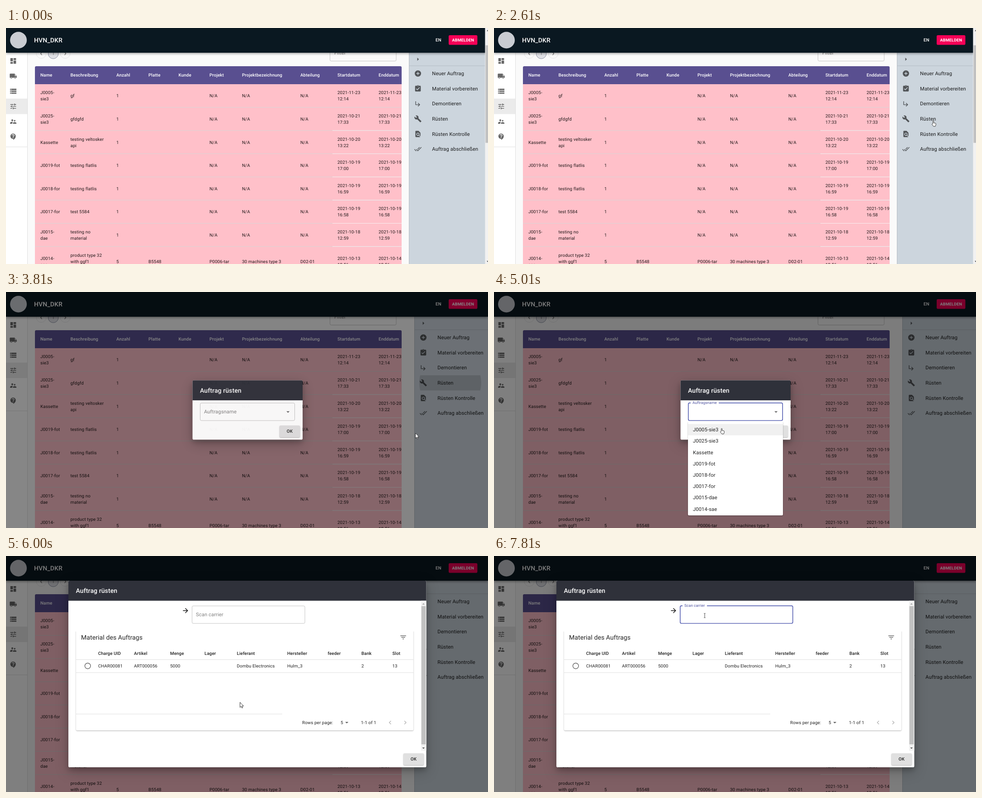
An HTML page that plays this animation: 1066x525 px, repeating every 8000 ms.

```html
<!DOCTYPE html>
<html lang="de">
<head>
<meta charset="utf-8">
<title>Auftrag rüsten</title>
<style>
html, body { margin: 0; width: 100%; height: 100%; overflow: hidden; background: #fafafa; }
svg { display: block; width: 100vw; height: 100vh; }
text {
  font: 400 9.8px Roboto, sans-serif; letter-spacing: .0107em;
  fill: rgba(0, 0, 0, .87); white-space: pre; text-rendering: geometricPrecision;
}
.b { font-weight: 500; }
.w { fill: #fff; }
.mute { fill: rgba(0, 0, 0, .5); }
.mid { text-anchor: middle; }
.accent { fill: #4a4f9e; }
.icons { fill: rgba(0, 0, 0, .6); fill-rule: evenodd; }
.line { stroke: #e0e0e0; fill: none; }
.frame { fill: none; stroke: #c4c4c4; }
.focus { fill: none; stroke: #3f4aa8; stroke-width: 1.4; }
.raised { filter: drop-shadow(0 1px 1.2px rgba(0, 0, 0, .32)); }
.modal { filter: drop-shadow(0 6px 6px rgba(0, 0, 0, .2)) drop-shadow(0 8px 14px rgba(0, 0, 0, .22)); }
.bar { filter: drop-shadow(0 2px 2.5px rgba(0, 0, 0, .38)); }
.cursor path { fill: #fff; stroke: #222; stroke-width: .9; stroke-linejoin: round; }
</style>
</head>
<body>
<svg id="stage" viewBox="0 0 1066 525"></svg>
<script>
const LOOP = 8000;
const stage = document.getElementById('stage');

const ICONS = {
  dashboard: 'M3 13h8V3H3zm0 8h8v-6H3zm10 0h8V11h-8zm0-18v6h8V3z',
  truck: 'M20 8h-3V4H3a2 2 0 0 0-2 2v11h2a3 3 0 0 0 6 0h6a3 3 0 0 0 6 0h2v-5zM4.500 17a1.500 1.500 0 0 0 3 0a1.500 1.500 0 0 0-3 0zM17 12h4.460L19.500 9.500H17zM16.500 17a1.500 1.500 0 0 0 3 0a1.500 1.500 0 0 0-3 0z',
  storage: 'M2 20h20v-4H2zm2-3h2v2H4zM2 4v4h20V4zm4 3H4V5h2zm-4 7h20v-4H2zm2-3h2v2H4z',
  tune: 'M3 17v2h6v-2zM3 5v2h10V5zm10 16v-2h8v-2h-8v-2h-2v6zM7 9v2H3v2h4v2h2V9zm14 4v-2H11v2zm-6-4h2V7h4V5h-4V3h-2z',
  people: 'M14 9.500a2.500 2.500 0 0 0 5 0a2.500 2.500 0 0 0-5 0zM6 8a3 3 0 0 0 6 0a3 3 0 0 0-6 0zM16.500 14c-1.830 0-5.500.9-5.500 2.750V19h11v-2.250c0-1.830-3.700-2.750-5.500-2.750zM9 13c-2.330 0-7 1.170-7 3.500V19h7v-2.250c0-.85.33-2.340 2.370-3.470C10.500 13.100 9.660 13 9 13z',
  help: 'M11.500 2a8.500 8.500 0 0 0 0 17h.5v3c4.860-2.340 8-7 8-11.500A8.500 8.500 0 0 0 11.500 2zm1 14.500h-2v-2h2zm0-3.500h-2c0-3.250 3-3 3-5a2 2 0 0 0-4 0h-2a4 4 0 0 1 8 0c0 2.500-3 2.750-3 5z',
  add: 'M12 2a10 10 0 0 0 0 20a10 10 0 0 0 0-20zm5 11h-4v4h-2v-4H7v-2h4V7h2v4h4z',
  task: 'M19 3h-4.200a3 3 0 0 0-5.600 0H5a2 2 0 0 0-2 2v14a2 2 0 0 0 2 2h14a2 2 0 0 0 2-2V5a2 2 0 0 0-2-2zm-7 0a1 1 0 0 1 0 2a1 1 0 0 1 0-2zm-2 14l-4-4 1.400-1.400L10 14.200l6.600-6.600L18 9z',
  turn: 'M19 15l-6 6-1.400-1.400L15.200 16H4V4h2v10h9.200l-3.600-3.600L13 9z',
  wrench: 'M22.700 19l-9.100-9.100c.9-2.300.4-5-1.500-6.900-2-2-5-2.400-7.400-1.300L9 6 6 9 1.600 4.700C.4 7.100.9 10.100 2.900 12.100c1.900 1.900 4.600 2.400 6.900 1.500l9.100 9.100c.4.4 1 .4 1.400 0l2.300-2.300c.5-.4.5-1.100.1-1.400z',
  search: 'M20 19.600V8l-6-6H6a2 2 0 0 0-2 2v16a2 2 0 0 0 2 2h12l1.200-.4-4.400-4.400A5 5 0 1 1 16.200 15.800zM9 13a3 3 0 0 0 6 0a3 3 0 0 0-6 0z',
  done: 'M18 7l-1.400-1.400-6.350 6.350 1.400 1.400zm4.240-1.400L11.660 16.170 7.480 12l-1.410 1.400L11.660 19l12-12zM.4 13.400L6 19l1.400-1.400L1.830 12z',
  play: 'M10 17l5-5-5-5z',
  drop: 'M7 10l5 5 5-5z',
  filter: 'M10 18h4v-2h-4zM3 6v2h18V6zm3 7h12v-2H6z',
  left: 'M15.400 7.400L14 6l-6 6 6 6 1.400-1.400L10.800 12z',
  right: 'M10 6L8.600 7.400 13.200 12l-4.600 4.600L10 18l6-6z',
  forward: 'M12 4l-1.400 1.400L16.200 11H4v2h12.200l-5.600 5.600L12 20l8-8z',
  close: 'M19 6.400L17.600 5 12 10.600 6.400 5 5 6.400 10.600 12 5 17.600 6.400 19 12 13.400 17.600 19 19 17.600 13.400 12z'
};

// Markup helpers; text and icons are placed by their vertical centre.
const rect = (x, y, w, h, attrs) => `<rect x="${x}" y="${y}" width="${w}" height="${h}" ${attrs}/>`;
const path = (d, attrs) => `<path d="${d}" ${attrs}/>`;
const text = (x, cy, str, cls = '', size = 9.8, style = '') =>
  `<text x="${x}" y="${cy + size * .357}" class="${cls}" style="font-size:${size}px;${style}">${str}</text>`;
const icon = (name, cx, cy, size = 16.8, attrs = '') =>
  path(ICONS[name], `transform="translate(${cx - size / 2} ${cy - size / 2}) scale(${size / 24})" ${attrs}`);
const group = (id, body, attrs = '') => `<g id="${id}" ${attrs}>${body}</g>`;
const lines = (x, cy, str) => {
  const parts = str.split('|');
  return parts.map((s, i) => text(x, cy + (i - (parts.length - 1) / 2) * 14, s)).join('');
};
const okButton = (x, y) => rect(x, y, 45, 26, 'rx="2.800" fill="#e0e0e0" class="raised"') +
  text(x + 22.5, y + 13, 'OK', 'b mid', 9.8, 'letter-spacing:.028em');
const modal = (x, y, w, h) =>
  rect(x, y, w, h, 'rx="2.800" fill="#fff" class="modal"') +
  path(`M${x} ${y + 44.5}v-41.700q0-2.800 2.800-2.800h${w - 5.6}q2.800 0 2.800 2.800v41.700z`, 'fill="#2f313a"') +
  text(x + 16.5, y + 22.3, 'Auftrag rüsten', 'b w', 14, 'letter-spacing:.0075em');
const field = (x, y, w, label) =>
  rect(x + .5, y + .5, w - 1, 39, 'rx="2.800" class="frame"') +
  text(x + 9, y + 19.8, label, 'mute', 11.2, 'letter-spacing:.0094em');
const focusedField = (x, y, w, label, notch) =>
  rect(x, y - .5, w, 41, 'fill="#fff"') +
  rect(x + .7, y + .2, w - 1.4, 39.2, 'rx="2.800" class="focus"') +
  rect(x + 6, y - 1, notch, 3, 'fill="#fff"') +
  text(x + 10, y - .2, label, 'accent', 8.4, 'letter-spacing:.0094em');

const COLS = [76, 142.5, 244, 315, 381.5, 450, 522, 651, 733, 824];
const HEADS = ['Name', 'Beschreibung', 'Anzahl', 'Platte', 'Kunde', 'Projekt',
  'Projektbezeichnung', 'Abteilung', 'Startdatum', 'Enddatum'];
const JOBS = [
  ['J0005-|sie3', 'gf', '2021-11-23|12:14'],
  ['J0025-|sie3', 'gfdgfd', '2021-10-21|17:33'],
  ['Kassette', 'testing veltosker|api', '2021-10-20|13:22'],
  ['J0019-fot', 'testing flatlis', '2021-10-19|17:00'],
  ['J0018-for', 'testing flatlis', '2021-10-19|16:59'],
  ['J0017-for', 'test 5584', '2021-10-19|16:58'],
  ['J0015-|dae', 'testing no|material', '2021-10-18|12:59']
];
const ROW = 51.6;

function jobTable() {
  let out = rect(64, 100, 811, 430, 'fill="#ffc0c9"') +
    path('M64 125V88q0-3 3-3h805q3 0 3 3v37z', 'fill="#594f90"') +
    HEADS.map((h, i) => text(COLS[i], 105, h, 'b w')).join('');
  JOBS.forEach(([name, info, date], i) => {
    const cy = 151 + i * ROW, y = 125 + (i + 1) * ROW - .1;
    const cells = [name, info, '1', '', '', 'N/A', 'N/A', 'N/A', date, date];
    out += cells.map((c, k) => lines(COLS[k], cy, c)).join('') +
      path(`M64 ${y}H875`, 'stroke="#d9d5d6"') +
      (i ? path(`M722 ${y}H875`, 'stroke="#f7eff0"') : '');
  });
  const last = ['J0014-|sae', 'product type 32|with ggf1|part', '5', 'B5548', '', 'P0006-tar',
    '30 machines type 3', 'D02-01', '2021-10-13|12:56', '2021-10-14|12:56'];
  out += last.map((c, k) => lines(COLS[k], 519.3, c)).join('');
  return `<clipPath id="tableClip">${rect(64, 80, 811, 445, '')}</clipPath><g clip-path="url(#tableClip)">${out}</g>`;
}

function topOfList() {
  return '<circle cx="78" cy="56.500" r="11" fill="none" stroke="#e4e4e6"/><circle cx="131" cy="56.500" r="11" fill="none" stroke="#e4e4e6"/>' +
    '<circle cx="104.500" cy="57" r="11.300" fill="#dfe0e5" stroke="#8d93a5"/>' +
    `<g class="icons">${icon('left', 78, 57, 14)}${icon('right', 131, 57, 14)}</g>` +
    text(104.5, 57, '1', 'mid mute') +
    rect(716.5, 34.5, 146.5, 39, 'rx="2.800" class="frame"') + text(726, 55, 'Filter', 'mute', 11.2);
}

function leftNav() {
  const names = ['dashboard', 'truck', 'storage', 'tune', 'people', 'help'];
  return rect(0, 55, 47, 470, 'fill="#fff"') + rect(0, 157, 47, 34.5, 'fill="#ebebeb"') +
    path('M47.500 55V525M0 264.500H47', 'class="line"') +
    `<g class="icons">${names.map((n, i) => icon(n, 16, 73.3 + i * 33.7)).join('')}</g>`;
}

function actions() {
  const items = [['add', 'Neuer Auftrag'], ['task', 'Material vorbereiten'], ['turn', 'Demontieren'],
    ['wrench', 'Rüsten'], ['search', 'Rüsten Kontrolle'], ['done', 'Auftrag abschließen']];
  return rect(891.5, 55, 180, 470, 'fill="#ccd5dd"') +
    path('M891.500 55V525M892 84H1072', 'stroke="#b4bcc4"') +
    rect(892, 185.3, 180, 33.7, 'id="hover" fill="#c1cad1"') +
    `<clipPath id="rowClip">${rect(892, 185.3, 180, 33.7, '')}</clipPath>` +
    '<circle id="ripple" cx="970.500" cy="202" r="68.500" fill="#000" fill-opacity=".13" clip-path="url(#rowClip)"/>' +
    `<g class="icons">${icon('play', 911, 69.5)}${items.map(([n], i) => icon(n, 911, 101.3 + i * 33.6)).join('')}</g>` +
    items.map(([, s], i) => text(942.3, 101.3 + i * 33.6, s, '', 11.2, 'letter-spacing:.0094em')).join('');
}

function header() {
  return rect(0, 0, 1066, 55, 'fill="#0a1821" class="bar"') +
    '<circle cx="27.500" cy="27" r="18.500" fill="#c9ccd2"/>' +
    text(62, 27, 'HVN_DKR', 'b w', 14, 'letter-spacing:.0075em') +
    text(950, 27, 'EN', 'b w', 9.8, 'letter-spacing:.028em') +
    rect(979, 16, 63.5, 21.5, 'rx="2.800" fill="#f50057"') +
    text(1010.8, 27, 'ABMELDEN', 'w mid', 9.1, 'font-weight:700;letter-spacing:.02em');
}

function pageScroll() {
  return rect(1059.5, 0, 7, 525, 'fill="#f1f1f1"') + rect(1060.5, 38.5, 6, 217, 'fill="#c1c1c1"') +
    path('M1063 7l3-3v3zM1063 518l3 3v-3z', 'fill="#555"');
}

function pickDialog() {
  const names = ['J0005-sie3', 'J0025-sie3', 'Kassette', 'J0019-fot', 'J0018-for', 'J0017-for', 'J0015-dae', 'J0014-sae'];
  const menu = rect(429, 288, 210, 209, 'rx="2.800" fill="#fff" class="raised"') +
    rect(429, 293.6, 210, 25.2, 'id="option" fill="#f0f0f0"') +
    names.map((n, i) => text(440, 306.2 + i * 25.2, n, '', 11.2)).join('');
  const chosen = text(439.5, 266.7, 'J0005-sie3', '', 11.2, 'letter-spacing:.0094em') +
    rect(495.5, 260, 1, 13, 'fill="#111"') +
    `<g class="icons">${icon('close', 605.5, 266.7, 14)}</g>`;
  return modal(412.5, 196.5, 243.5, 132) + group('idleName', field(429, 246.5, 210, 'Auftragsname')) +
    group('focusName', focusedField(429, 246.5, 210, 'Auftragsname', 62)) +
    group('chosen', chosen) +
    `<g class="icons">${icon('drop', 623.7, 266.7)}</g>` + okButton(605, 297) + group('menu', menu);
}

function setupDialog() {
  const cols = [[203.7, 'Charge UID', 'CHAR00081'], [283, 'Artikel', 'ART000056'], [363, 'Menge', '5000'],
    [439, 'Lager', ''], [510.5, 'Lieferant', 'Dombu Electronics'], [622, 'Hersteller', 'Hulm_3'],
    [711.5, 'feeder', ''], [786, 'Bank', '2'], [854.5, 'Slot', '13']];
  return modal(138, 55, 791.5, 415) +
    rect(918, 99.5, 11.5, 333.5, 'fill="#f1f1f1"') + rect(918.7, 111.5, 9.5, 307.5, 'fill="#c1c1c1"') +
    path('M920.500 108l2.800-3 2.800 3z', 'fill="#a3a3a3"') + path('M920.500 426l2.800 3 2.800-3z', 'fill="#505050"') +
    icon('forward', 397, 121.5, 17, 'fill="#111"') +
    rect(155, 160, 746, 228, 'rx="2.800" fill="#fff" class="raised"') + rect(150, 152, 756, 16, 'fill="#fff"') +
    group('idleScan', field(411, 110.5, 250.5, 'Scan carrier')) +
    group('focusScan', focusedField(411, 110.5, 250.5, 'Scan carrier', 54)) +
    rect(421, 123.5, 1, 13.5, 'id="scanCaret" fill="#111"') +
    text(166, 181, 'Material des Auftrags', '', 14, 'letter-spacing:.0075em') +
    cols.map(([x, h, v]) => text(x, 216.5, h, 'b') + text(x, 244.5, v)).join('') +
    path('M155 230.500H901M155 259.500H901M155 351.500H611', 'class="line"') +
    '<circle cx="180.700" cy="244.500" r="6.300" fill="none" stroke="#666" stroke-width="1.400"/>' +
    text(655, 370.5, 'Rows per page:') + text(740, 370.5, '5') + text(785, 370.5, '1-1 of 1') +
    `<g class="icons">${icon('filter', 878.5, 181)}${icon('drop', 753.7, 370.5)}` +
    `<g opacity=".5">${icon('left', 849.5, 370.5)}${icon('right', 883, 370.5)}</g></g>` + okButton(879, 439);
}

const cursors = group('arrow', path('M0 0V11.300L2.600 9 4.300 12.700 6 12 4.400 8.300H8Z', '')) +
  group('hand', path('M2.600 7V1.500a1 1 0 0 1 2 0V5l3.800.9q1 .3 1 1.300l-.5 3.300-.9 2.300H4L.7 8.600c-.5-1 .6-1.600 1.200-1z', '')) +
  group('beam', path('M-1.700-5Q0-5 0-4Q0-5 1.700-5M0-4V4M-1.700 5Q0 5 0 4Q0 5 1.700 5', 'style="fill:none;stroke:#333"'));

stage.innerHTML = rect(0, 0, 1066, 525, 'fill="#fafafa"') + topOfList() + jobTable() + leftNav() +
  group('actions', actions()) + header() + group('pageScroll', pageScroll()) +
  rect(0, 0, 1066, 525, 'id="shade"') + group('pick', pickDialog()) + group('setup', setupDialog()) +
  group('cursor', cursors, 'class="cursor"');

// Visible spans in ms: [id, from, to].
const SPANS = [
  ['hover', 3210, 3810], ['ripple', 3810, 4010], ['pageScroll', 0, 3810], ['shade', 3810, LOOP],
  ['pick', 3810, 6000], ['idleName', 0, 4610], ['focusName', 4610, LOOP], ['menu', 4810, 5210],
  ['option', 5010, 5210], ['chosen', 5210, LOOP], ['setup', 6000, LOOP],
  ['idleScan', 0, 7200], ['focusScan', 7200, LOOP], ['scanCaret', 7420, 7810]
];
// The pointer jumps: time, x, y, shape.
const POINTER = [
  [0, -40, -40, 'arrow'], [590, 852, 428, 'arrow'], [790, 904, 330, 'hand'], [990, 966, 197, 'hand'],
  [1190, 1008, 232, 'hand'], [1390, 1042, 268, 'hand'], [1590, 1034, 282, 'hand'], [1790, 905, 240, 'hand'],
  [2010, 967, 198, 'hand'], [2610, 968, 206, 'hand'], [2810, 967, 198, 'hand'], [3410, 971, 198, 'arrow'],
  [3810, 905.5, 314, 'arrow'], [4010, 760, 285, 'arrow'], [4200, 674, 268, 'arrow'], [4410, 560, 267, 'beam'],
  [4810, 530, 270, 'beam'], [5010, 500, 303, 'hand'], [5210, 505, 304, 'arrow'], [5400, 515, 309, 'arrow'],
  [5600, 522, 313, 'arrow'], [5800, 524, 314, 'arrow'], [6000, 517.5, 325.5, 'arrow'], [6200, 470, 292, 'arrow'],
  [6400, 404, 256, 'arrow'], [6600, 358, 232, 'arrow'], [6800, 392, 170, 'arrow'], [7000, 466, 132.5, 'beam']
];
const el = id => document.getElementById(id);
const show = (id, on) => { el(id).style.display = on ? '' : 'none'; };

function draw(now) {
  const t = now % LOOP;
  SPANS.forEach(([id, from, to]) => show(id, t >= from && t < to));
  const shifted = t >= 3810, fade = t < 4010 ? .95 : 1;
  el('actions').setAttribute('transform', `translate(${shifted ? 12 : 0} 0)`);
  el('shade').setAttribute('fill-opacity', .5 * fade);
  el('pick').setAttribute('opacity', fade);
  const [, x, y, shape] = POINTER.filter(p => p[0] <= t).pop();
  el('cursor').setAttribute('transform', `translate(${x} ${y})`);
  ['arrow', 'hand', 'beam'].forEach(s => show(s, s === shape));
}

const start = performance.now();
function tick() {
  draw(performance.now() - start);
  requestAnimationFrame(tick);
}
tick();
</script>
</body>
</html>
```
